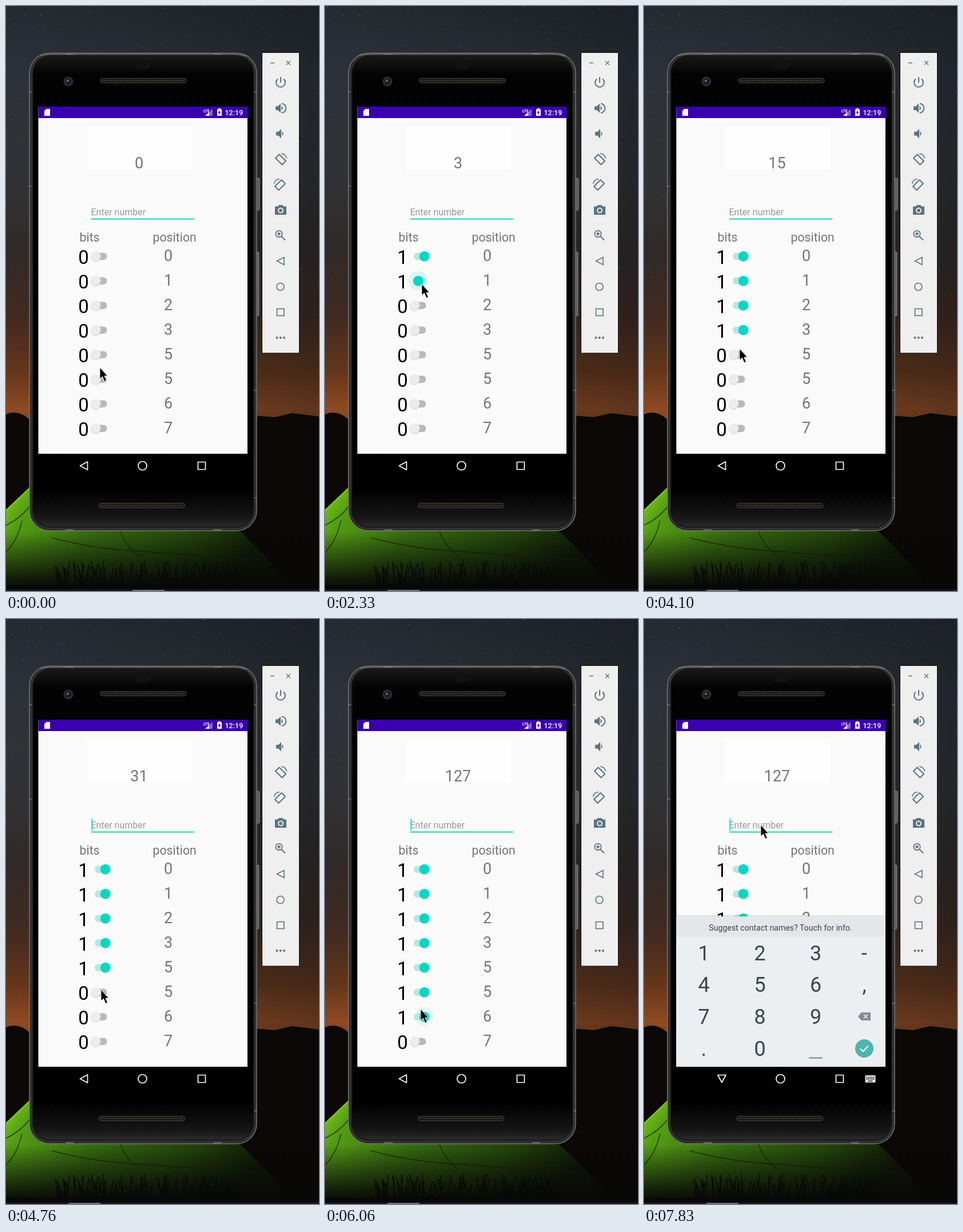
An HTML page that plays this animation: 547x1023 px, repeating every 8000 ms.

```html
<!DOCTYPE html>
<html lang="en">
<head>
<meta charset="utf-8">
<title>Bit switches</title>
<style>
  html, body { margin: 0; width: 100%; height: 100%; overflow: hidden; background: #0a0807; }
  svg { display: block; width: 100vw; height: 100vh; }
  text { font-family: Roboto, sans-serif; }
  .mid { text-anchor: middle; }
  .grey { fill: #757575; }
  .line { fill: none; stroke: #587480; stroke-width: 2; }
  .solid { fill: #587480; stroke: none; }
  .nav { fill: none; stroke: #fff; stroke-width: 1.7; stroke-linejoin: round; }
</style>
</head>
<body>
<svg viewBox="0 0 547 1023">
  <defs>
    <linearGradient id="sky" x2="0" y2="1">
      <stop offset="0" stop-color="#252a31"/>
      <stop offset=".15" stop-color="#2c3139"/>
      <stop offset=".4" stop-color="#313236"/>
      <stop offset=".58" stop-color="#302a28"/>
      <stop offset=".74" stop-color="#402a20"/>
      <stop offset=".87" stop-color="#643619"/>
      <stop offset=".96" stop-color="#8f4a22"/>
      <stop offset="1" stop-color="#7c401f"/>
    </linearGradient>
    <linearGradient id="shade">
      <stop offset=".1" stop-color="#0d1014" stop-opacity="0"/>
      <stop offset="1" stop-color="#0d1014" stop-opacity=".36"/>
    </linearGradient>
    <linearGradient id="tent" x2="1" y2=".25">
      <stop offset="0" stop-color="#80d31a"/>
      <stop offset=".12" stop-color="#559d14"/>
      <stop offset=".4" stop-color="#366a10"/>
      <stop offset=".75" stop-color="#22420b"/>
      <stop offset="1" stop-color="#0f1a07"/>
    </linearGradient>
    <linearGradient id="dusk" x2="0" y2="1">
      <stop offset="0" stop-color="#080807" stop-opacity="0"/>
      <stop offset=".8" stop-color="#080807" stop-opacity=".85"/>
      <stop offset="1" stop-color="#080807"/>
    </linearGradient>
    <linearGradient id="body" x2="0" y2="1">
      <stop offset="0" stop-color="#191919"/>
      <stop offset=".04" stop-color="#030303"/>
      <stop offset=".92" stop-color="#000"/>
      <stop offset=".98" stop-color="#161616"/>
      <stop offset="1" stop-color="#2c2c2c"/>
    </linearGradient>
    <clipPath id="screen"><path d="M56.500 176H422V783H56.500Z"/></clipPath>
    <clipPath id="card"><path d="M141 210H325V286H141Z"/></clipPath>
  </defs>

  <!-- night landscape -->
  <path fill="url(#sky)" d="M0 0H547V735H0Z"/>
  <path fill="url(#shade)" d="M0 0H547V735H0Z"/>
  <g id="stars"></g>
  <path fill="#0b0807" d="M0 714Q20 705 40 722L430 716 470 719 500 712 525 715 547 718V1023H0Z"/>
  <path fill="url(#tent)" d="M0 882L42 842 400 910Q455 960 492 1010L0 1012Z"/>
  <g fill="none" stroke="#132b07" stroke-width="1.500" opacity=".8">
    <path d="M0 908Q26 896 44 872M200 918Q206 940 232 962M0 955Q20 935 28 900M80 930Q150 948 212 952T440 968"/>
    <path stroke="#8ee522" stroke-width="2" d="M0 882L42 842"/>
  </g>
  <path fill="url(#dusk)" d="M0 920H547V1023H0Z"/>
  <path id="grass" fill="none" stroke="#070907" stroke-width="1.500"/>
  <path fill="#15171b" d="M0 1020H547V1023H0Z"/>
  <path id="taskMark" fill="#6c7076" d="M0 1021H56V1023H0Z"/>

  <!-- phone -->
  <g fill="#5c5c5c" stroke="#999" stroke-width=".8">
    <rect x="436" y="301" width="7" height="56" rx="2"/>
    <rect x="436" y="430" width="6" height="112" rx="2"/>
  </g>
  <rect x="41" y="82.500" width="397" height="835" rx="35" fill="#202020" stroke="#777" stroke-width="1.500"/>
  <rect x="44" y="86" width="391" height="828" rx="32" fill="none" stroke="#333" stroke-width="3"/>
  <rect x="47.500" y="87" width="385" height="824" rx="30" fill="url(#body)" stroke="#111"/>
  <path stroke="#777" stroke-width="1.500" d="M40 150h5M40 315h5M434 150h5M434 672h5M434 860h5M104 916h14M362 916h14M104 84h14M362 84h14"/>
  <path fill="none" stroke="#8a8a8a" d="M60 87Q70 84 85 84H395Q410 84 420 88"/>
  <g fill="#1d1a16" stroke="#48433c">
    <rect x="164.500" y="126.500" width="151" height="8" rx="4"/>
    <rect x="162" y="869.500" width="151" height="8" rx="4"/>
    <path stroke="#68604f" stroke-width="1" stroke-dasharray="2 2" d="M168 130.500H312M166 873.500H309"/>
  </g>
  <rect x="226" y="99" width="27" height="11" rx="5" fill="#111214"/>
  <circle cx="109" cy="132" r="8.500" fill="#2b2d32"/>
  <circle cx="109" cy="132" r="5" fill="#181a24"/>
  <circle cx="108" cy="131" r="2" fill="#636b88"/>

  <!-- app -->
  <path fill="#fafafa" d="M56.500 176H422V783H56.500Z"/>
  <path fill="#3900af" d="M56.500 176H422V196H56.500Z"/>
  <g fill="#fff">
    <path d="M70.500 180H77V192H67V183.500Z"/>
    <path opacity=".4" d="M361 180V192H348Z"/>
    <path d="M355 186V192H348Z"/>
    <path d="M371 180.500V179H375V180.500H377V192H369V180.500Z"/>
    <path fill="#3900af" d="M373.500 182L370.500 187H372.500V190.500L375.500 185.500H373.500Z"/>
    <text x="345" y="186" font-size="6.500" font-weight="700">LTE</text>
    <text x="382.500" y="190.500" font-size="12.500" font-weight="500">12:19</text>
  </g>
  <path fill="#fefefe" d="M141 210H325V286H141Z"/>
  <g clip-path="url(#card)"><text id="total" class="mid grey" x="232.500" y="283.500" font-size="27"></text></g>
  <text x="148.500" y="365.500" font-size="16" fill="#999">Enter number</text>
  <path fill="#18d3c5" d="M149 371.500H329V373.500H149Z"/>
  <path id="caret" fill="#18d3c5" d="M149.500 349H151.200V370H149.500Z"/>
  <g class="grey" font-size="21.300">
    <text x="128.500" y="412">bits</text>
    <text x="256.500" y="412">position</text>
  </g>
  <g id="rows"></g>

  <!-- keyboard -->
  <g clip-path="url(#screen)">
    <g id="keyboard">
      <path fill="#000" opacity=".1" d="M56 518H422V521H56Z"/>
      <path fill="#e3e7e9" d="M56 520H422V557H56Z"/>
      <path fill="#eceff1" d="M56 556H422V822H56Z"/>
      <text class="mid" x="238.500" y="544.500" font-size="14.150" fill="#37474f">Suggest contact names? Touch for info.</text>
      <g id="keys" class="mid" font-size="36" fill="#37474f"></g>
      <path fill="#838d92" d="M374 695L380 688H396V702H380Z"/>
      <path fill="none" stroke="#eceff1" stroke-width="1.600" d="M384 691.500L391 698.500M391 691.500L384 698.500"/>
      <path fill="#78858b" d="M288 766.500H312V768.500H288Z"/>
      <circle cx="385" cy="751" r="16" fill="#4db6ac"/>
      <path fill="none" stroke="#fff" stroke-width="2" d="M378 751.500L383 756 392 746.500"/>
    </g>
  </g>

  <!-- navigation bar -->
  <path id="back" class="nav" d="M129.500 804L142.500 797V811Z"/>
  <circle class="nav" cx="238.500" cy="804" r="7.500"/>
  <rect class="nav" x="335.500" y="797.500" width="13" height="13"/>
  <g id="imeIcon">
    <rect x="386.500" y="798" width="18" height="12.500" rx="1.500" fill="#eee"/>
    <path stroke="#111" stroke-width="1.800" stroke-dasharray="1.800 1.200" d="M388.500 801.500H403M388.500 804.500H403"/>
    <path stroke="#111" stroke-width="1.500" d="M391.500 808H399.500"/>
  </g>

  <!-- emulator toolbar -->
  <rect x="447.500" y="81.500" width="65" height="525.500" fill="#efefef" stroke="#0d0d0d"/>
  <path class="line" style="stroke-width:1.300" d="M462 99.500H469M490 96L497 103M497 96L490 103"/>
  <g class="line">
    <path d="M480 124V134M475 127.500A8 8 0 1 0 485 127.500"/>
    <g id="speaker"><path class="solid" d="M471 175.500H475L480 170.500V187L475 182H471Z"/><path class="solid" d="M481.500 174.500Q486 178.500 481.500 183Z"/></g>
    <path d="M482 170.500A8.300 8.300 0 0 1 482 187"/>
    <use href="#speaker" x="1" y="44.500"/>
    <g id="rotate">
      <path stroke-linejoin="round" d="M477.500 259.500L489 271 482.500 277.500 471 266Z"/>
      <path stroke-width="1.500" d="M481 258Q489 258.500 490.500 266.500"/>
    </g>
    <use href="#rotate" transform="translate(959 44.500) scale(-1 1)"/>
    <path class="solid" fill-rule="evenodd" d="M470 350.500H474.500L477 348H483L485.500 350.500H490V365H470ZM480 352.500a5 5 0 1 0 .1 0Z"/>
    <circle class="solid" cx="480" cy="357.500" r="3"/>
    <path d="M481.500 403L488 409.500M474 398.500H480M477 395.500V401.500"/>
    <circle cx="477" cy="398.500" r="5.700" stroke-width="1.700"/>
    <path stroke-width="1.600" d="M473.500 446L486 439.500V452.500Z"/>
    <circle cx="479.500" cy="491" r="6.500" stroke-width="1.600"/>
    <rect x="473.500" y="529.500" width="12.500" height="12" stroke-width="1.600"/>
    <path class="solid" d="M471.500 580a2 2 0 1 0 4 0a2 2 0 1 0-4 0M477.700 580a2 2 0 1 0 4 0a2 2 0 1 0-4 0M483.900 580a2 2 0 1 0 4 0a2 2 0 1 0-4 0"/>
  </g>

  <path id="cursor" stroke="#fff" stroke-width=".9" d="M0 0V20L4.500 16 8 24.500 11.500 23 8 15H13.500Z"/>
</svg>

<script>
const LOOP = 8000;
const $ = id => document.getElementById(id);
const clamp = v => Math.max(0, Math.min(1, v));
const progress = (t, start, length) => clamp((t - start) / length);
const ease = p => (1 - Math.cos(Math.PI * p)) / 2;
const lerp = (a, b, p) => a + (b - a) * p;

function add(parent, tag, attributes, text = '') {
  const node = document.createElementNS('http://www.w3.org/2000/svg', tag);
  for (const name in attributes) node.setAttribute(name, attributes[name]);
  node.textContent = text;
  return parent.appendChild(node);
}

// Seeded scenery
let seed = 11;
const random = () => (seed = seed * 16807 % 2147483647) / 2147483647;
for (let i = 0; i < 260; i++) {
  add($('stars'), 'circle', {
    cx: random() * 547, cy: random() ** 1.5 * 560, r: 0.4 + random() * 0.5,
    fill: random() < 0.5 ? '#85858a' : '#6d5a4a', opacity: 0.3 + random() * 0.5
  });
}
let blades = '';
for (let i = 0; i < 170; i++) {
  const x = 90 + random() * 320, height = 12 + random() * 38;
  blades += `M${x} 1020q0 ${-height / 2} ${random() * 16 - 8} ${-height}`;
}
$('grass').setAttribute('d', blades);

// Each row turns on at its tap time; the last stays off.
const taps = [1270, 2230, 2980, 3690, 4400, 4870, 5830, Infinity];
const positions = [0, 1, 2, 3, 5, 5, 6, 7];
const rows = taps.map((tap, i) => {
  const y = 437.5 + 43 * i, parent = $('rows');
  add(parent, 'text', { class: 'mid grey', x: 283.5, y: y + 8.5, 'font-size': 27 }, positions[i]);
  return {
    tap,
    bit: add(parent, 'text', { class: 'mid', x: 135.5, y: y + 13.5, 'font-size': 33 }),
    ripple: add(parent, 'circle', { cy: y, fill: '#03dac5' }),
    track: add(parent, 'rect', { x: 155, y: y - 6, width: 21.5, height: 12.5, rx: 6.2 }),
    shadow: add(parent, 'circle', { cy: y + 1, r: 9.2, opacity: 0.13 }),
    thumb: add(parent, 'circle', { cy: y, r: 8.7 })
  };
});

['123-', '456,', '789', '.0'].forEach((line, row) =>
  [...line].forEach((key, column) => add($('keys'), 'text',
    { x: [104.5, 202.5, 300, 385][column], y: 596.5 + 55.8 * row }, key)));

// Pointer moves: start, end, x, y
const moves = [
  [0, 0, 164, 632], [30, 830, 168, 440], [1550, 1900, 169, 486],
  [2480, 2660, 169, 526], [3240, 3430, 167, 568], [3960, 4160, 167, 607],
  [4590, 4750, 166, 648], [4960, 5130, 167, 728], [5160, 5460, 167, 682],
  [6080, 6260, 202, 380], [6500, 6660, 204, 360]
];

function pointer(t) {
  let [, , x, y] = moves[0];
  for (const [start, end, toX, toY] of moves) {
    if (t < start) break;
    const p = ease(progress(t, start, end - start || 1));
    x = lerp(x, toX, p);
    y = lerp(y, toY, p);
  }
  return `translate(${x} ${y})`;
}

function drawRow({ tap, bit, ripple, track, shadow, thumb }, t) {
  const on = t >= tap;
  const x = lerp(157, 173.7, ease(progress(t, tap, 250)));
  bit.textContent = on ? 1 : 0;
  for (const part of [ripple, shadow, thumb]) part.setAttribute('cx', x);
  thumb.setAttribute('fill', on ? '#03d8c3' : '#ececec');
  track.setAttribute('fill', on ? '#a9ede6' : '#b9b9b9');
  ripple.setAttribute('r', lerp(6, 17, progress(t, tap - 70, 140)));
  ripple.setAttribute('opacity', t < tap - 70 ? 0 : 0.13 * (1 - progress(t, tap + 100, 300)));
}

function caretVisible(t) {
  if (t > 6900) return t >= 7640;
  return Math.floor((t - 960) / 519) & 1;
}

function draw() {
  const t = performance.now() % LOOP;
  rows.forEach(row => drawRow(row, t));
  $('total').textContent = taps.reduce((sum, tap, i) => sum + (t >= tap ? 2 ** i : 0), 0);
  $('caret').setAttribute('opacity', caretVisible(t) ? 1 : 0);
  $('cursor').setAttribute('transform', pointer(t));
  $('taskMark').setAttribute('transform', `translate(${t < 1200 ? 221 : 109})`);

  const turn = progress(t, 7130, 190);
  $('back').setAttribute('transform', `rotate(${-90 * turn} 136 804)`);
  $('imeIcon').setAttribute('opacity', turn);

  const rise = 1 - (1 - progress(t, 7610, 210)) ** 2;
  $('keyboard').setAttribute('transform', `translate(0 ${30 * (1 - rise)})`);
  $('keyboard').setAttribute('opacity', rise);
  requestAnimationFrame(draw);
}
draw();
</script>
</body>
</html>
```
